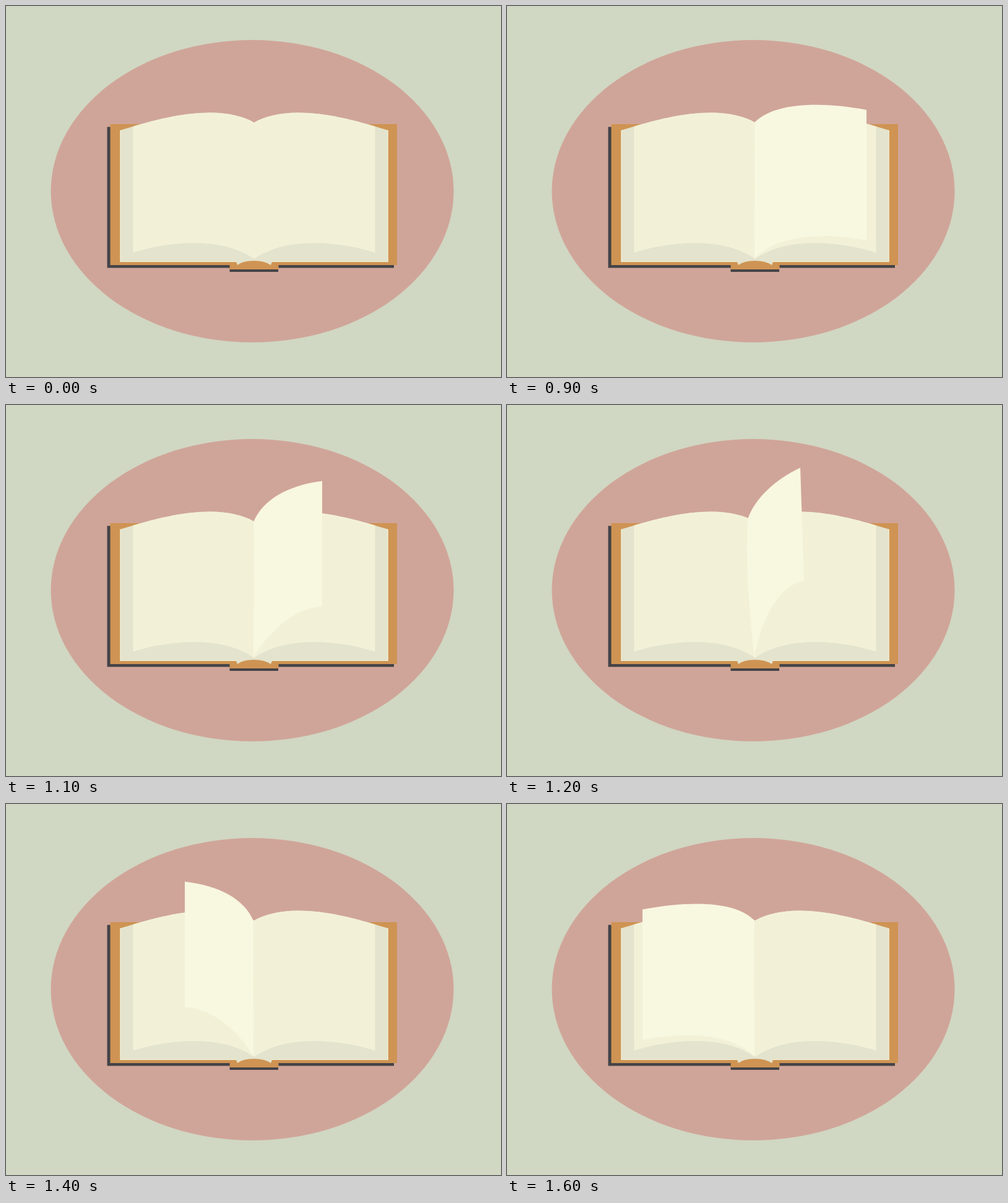
Recreate the animation shown at these times as an HTML page with a canvas. Size 800x600 px, loop 1700 ms.

```html
<!DOCTYPE html>
<html lang="en">
<head>
<meta charset="utf-8">
<title>Open book</title>
<style>
html, body { margin: 0; width: 100%; height: 100%; overflow: hidden; background: #d0d7c2; }
canvas { display: block; }
</style>
</head>
<body>
<canvas id="stage" width="800" height="600"></canvas>
<script>
const ctx = document.getElementById('stage').getContext('2d');
const LOOP = 1700, STEP = 100, TURN_START = 900;
const BG = '#d0d7c2', PINK = '#d0a599', COVER = '#cf9453', DARK = '#444347';
const PAGE = '#f2f1d8', EDGE = '#e4e3cd', LEAF = '#f8f7e0';

// Leaf points: hinge, two controls, tip, foot, two controls, spine control
const LOW = [400.5,188, 430,158, 500,153, 581,168, 581,379, 500,363, 432,375, 400.5,298];
const RAISED = [400.5,188, 416,153, 455,130, 511,123, 511,326, 462,328, 420,374, 400.5,298];
const UPRIGHT = [378,180, 385,150, 410,112, 437,80, 449,242, 418,255, 400,320, 367,245];

const mix = (a, b, k) => a.map((v, i) => v + (b[i] - v) * k);
const mirror = pose => pose.map((v, i) =>
  i % 2 === 0 ? 800 - v : v + (i > 4 && i < 12 ? 2.5 : 0));

const LEFT_RAISED = mirror(RAISED), LEFT_LOW = mirror(LOW);
const POSES = [
  LOW, mix(LOW, RAISED, 0.5), RAISED, mix(RAISED, UPRIGHT, 0.5), UPRIGHT,
  LEFT_RAISED, mix(LEFT_RAISED, LEFT_LOW, 0.5), LEFT_LOW
];

function box(color, x1, y1, x2, y2) {
  ctx.fillStyle = color;
  ctx.fillRect(x1, y1, x2 - x1, y2 - y1);
}

function shape(color, d) {
  ctx.fillStyle = color;
  ctx.fill(new Path2D(d));
}

function drawCover() {
  box(DARK, 163.5, 195.5, 627, 423.5);
  box(DARK, 361.5, 419, 440, 430);
  box(COVER, 168.5, 191, 632, 419);
  box(COVER, 361.5, 414, 440.5, 426);
}

const TOP = 'C240 184 285 172.5 330 172.5 C360 172.5 385 179 401 188.5' +
  'C417 179 442 172.5 472 172.5 C517 172.5 562 184 617.5 201';

function drawPages() {
  const block = new Path2D('M184.5 201' + TOP +
    'V414 H430 L428 419 Q418 412 400.5 412 Q383 412 374 419 L372 414 H184.5 Z');
  ctx.fillStyle = EDGE;
  ctx.fill(block);
  ctx.strokeStyle = PAGE;
  ctx.lineWidth = 1.2;
  ctx.stroke(new Path2D('M185 201 V413.5 H372 M430 413.5 H617 V201'));

  ctx.save();
  ctx.clip(block);
  shape(PAGE, 'M205.5 160 H596.5 V399 C547 383 457 370 401 409 C345 370 255 383 205.5 399 Z');
  ctx.restore();
}

function drawLeaf(p) {
  ctx.beginPath();
  ctx.moveTo(p[0], p[1]);
  ctx.bezierCurveTo(...p.slice(2, 8));
  ctx.lineTo(p[8], p[9]);
  ctx.bezierCurveTo(...p.slice(10, 14), 400, 408);
  ctx.quadraticCurveTo(p[14], p[15], p[0], p[1]);
  ctx.fillStyle = LEAF;
  ctx.fill();
}

function draw(time) {
  box(BG, 0, 0, 800, 600);
  ctx.beginPath();
  ctx.ellipse(398, 299.5, 325.5, 244.5, 0, 0, Math.PI * 2);
  ctx.fillStyle = PINK;
  ctx.fill();
  drawCover();
  drawPages();
  const pose = POSES[Math.floor((time - TURN_START) / STEP)];
  if (pose) drawLeaf(pose);
}

const start = performance.now();
function tick() {
  draw((performance.now() - start) % LOOP);
  requestAnimationFrame(tick);
}
tick();
</script>
</body>
</html>
```
